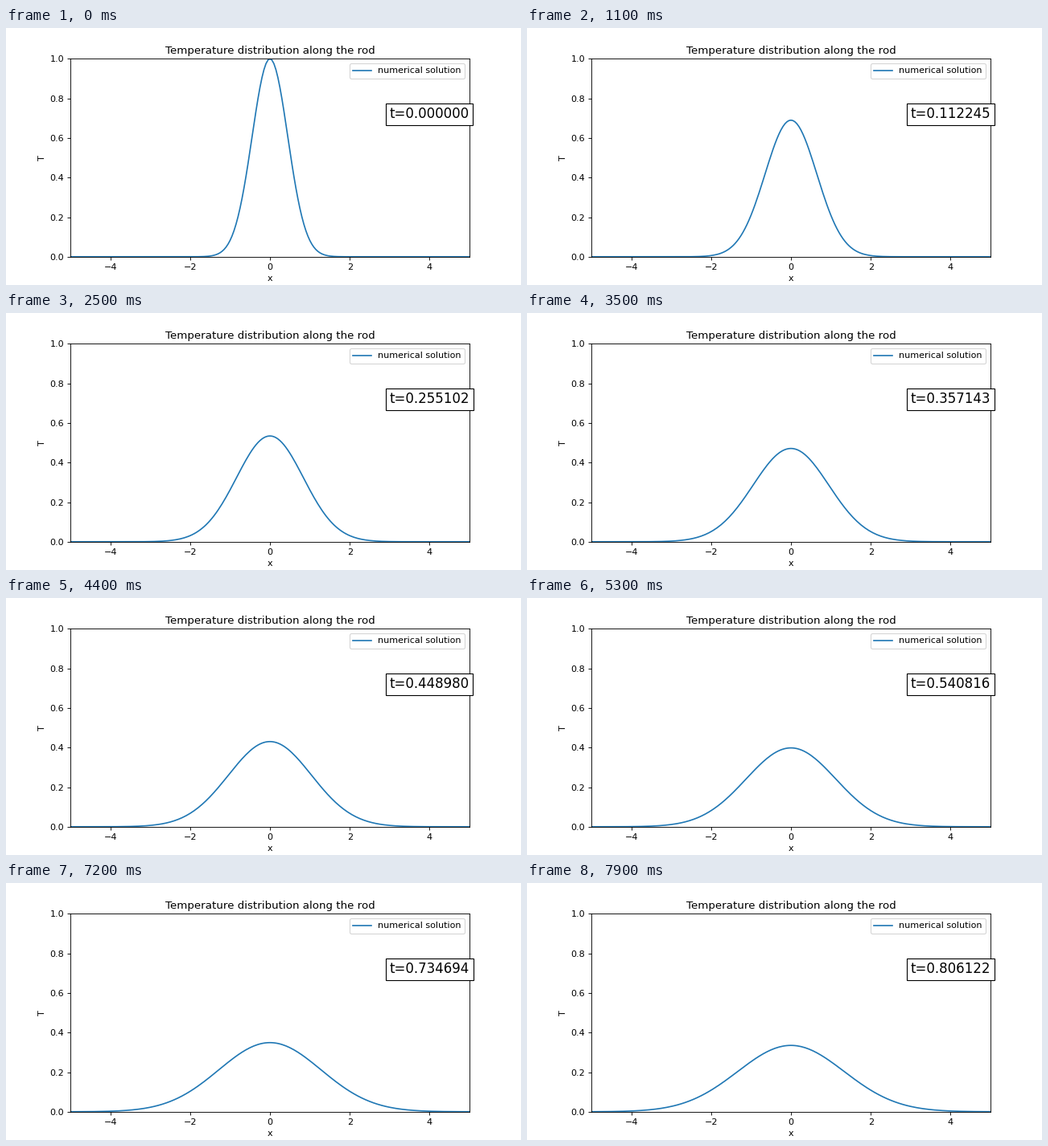
A matplotlib script for the animation above (8000 ms loop, 640x320 px).

```python
import numpy as np
import matplotlib.pyplot as plt
from matplotlib.animation import FuncAnimation

FRAMES = 80
INTERVAL = 100
A = 2.5       # sharpness of the initial Gaussian
DT = 0.01     # time step of the solution

x = np.linspace(-5, 5, 201)


def temperature(n):
    """Heat-equation solution for a Gaussian start after n steps."""
    spread = 1 + 4 * A * DT * n
    return np.exp(-A * x**2 / spread) / np.sqrt(spread)


plt.rcParams["font.family"] = "DejaVu Sans"
fig, ax = plt.subplots(figsize=(8, 4), dpi=80)
ax.set(xlim=(-5, 5), ylim=(0, 1), xlabel="x", ylabel="T",
       title="Temperature distribution along the rod")
line, = ax.plot(x, temperature(0), label="numerical solution")
ax.legend(loc="upper right")
clock = ax.text(3, 0.7, "t=0.000000", fontsize=15,
                bbox=dict(facecolor="white", edgecolor="black"))


def update(n):
    line.set_ydata(temperature(n))
    clock.set_text(f"t={n / 98:.6f}")
    return line, clock


anim = FuncAnimation(fig, update, frames=FRAMES, interval=INTERVAL,
                     repeat=True, repeat_delay=0)
plt.show()
```
